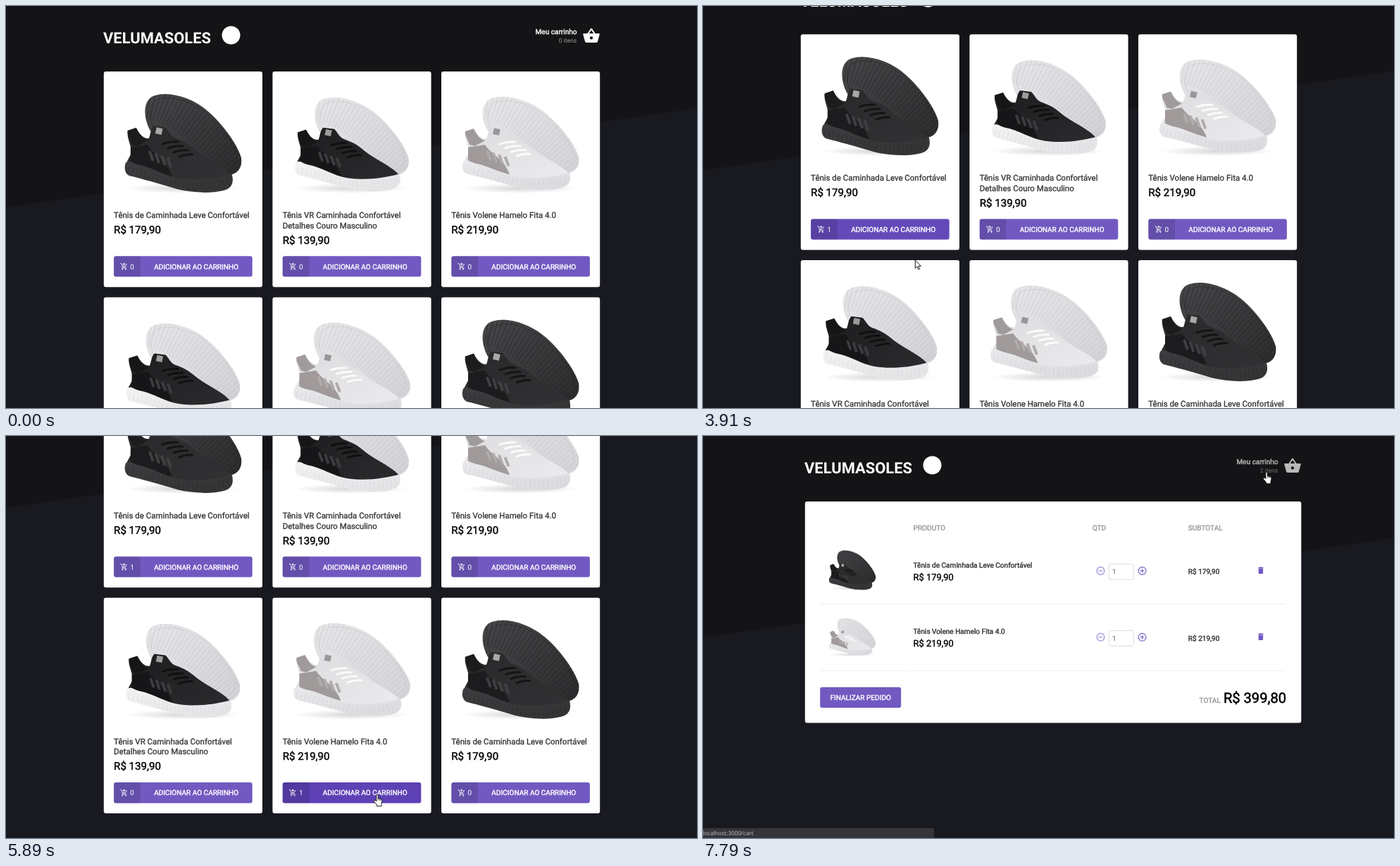
These frames come from a looping animation (981x571 px, 8 s). An HTML page:

```html
<!DOCTYPE html>
<html lang="pt-BR">
<head>
<meta charset="utf-8">
<title>Loja de tênis</title>
<style>
html, body { margin: 0; width: 100%; height: 100%; overflow: hidden; background: #191920; }
svg { display: block; }
text { font-family: Roboto, Arial, sans-serif; text-rendering: geometricPrecision; white-space: pre; }
</style>
</head>
<body>
<svg id="stage" width="981" height="571" viewBox="0 0 981 571"></svg>
<script>
const LOOP = 8000;
const PURPLE = [113, 89, 193], DEEP = [93, 65, 181];
const rgb = c => `rgb(${c.map(Math.round)})`;

// ---- drawing helpers ----
function text(x, y, s, size, o = {}) {
  const fill = o.fill || '#fff';
  const bold = o.bold ? ` stroke="${fill}" stroke-width="${(size * o.bold).toFixed(2)}"` : '';
  const id = o.id ? ` id="${o.id}"` : '';
  return `<text${id} x="${x}" y="${y}" font-size="${size}" fill="${fill}"${bold}` +
    ` text-anchor="${o.anchor || 'start'}" font-weight="${o.weight || 400}">${s}</text>`;
}
const rect = (x, y, w, h, fill, r = 0, more = '') =>
  `<rect x="${x}" y="${y}" width="${w}" height="${h}" rx="${r}" fill="${fill}" ${more}/>`;
const use = (id, x, y, k = 1) =>
  `<use href="#${id}" transform="translate(${x} ${y}) scale(${k})"/>`;

// ---- shoe pictures, in card coordinates ----
const BACK = 'M66 84C56 66 55 42 70 35C92 26 126 38 146 55C168 73 190 104 195 122C198 140 186 149 172 147C140 142 100 120 66 84Z';
const UPPER = 'M34 84L46 80C50 88 56 96 64 95C67 88 66 82 71 77L87 79C92 84 94 91 101 94C112 98 120 102 128 109C142 122 166 132 178 144C184 150 183 157 180 160C140 168 90 158 32 142C29 130 36 124 39 116C40 106 32 94 34 84Z';
const SOLE = 'M31 130C36 124 40 130 48 132C70 136 86 149 106 152C134 156 160 152 182 146C185 158 182 166 170 169C150 174 124 172 104 167C78 159 52 152 36 148C29 144 29 136 31 130Z';
const PANEL = 'M38 108L62 104C70 118 90 126 97 149C78 143 58 135 38 130Z';

const shoes = {
  dark: { back: ['#47474a', '#2c2c2e'], ridge: '#1d1d1f', upper: ['#29292b', '#323234'], sole: ['#3d3d40', '#333335'],
    line: '#232325', panel: '#1c1c1e', strap: '#3f3f42', lace: '#141416', tag: '#a8a8a8', move: '' },
  mixed: { back: ['#e6e6e9', '#d2d2d6'], ridge: '#bcbcc2', upper: ['#1d1d1f', '#2c2c2e'], sole: ['#f3f3f4', '#e2e2e5'],
    line: '#cfcfd3', panel: '#161618', strap: '#3c3c3f', lace: '#0f0f11', tag: '#9c9c9c',
    move: 'translate(2.7 6.5) scale(.976 .952)' },
  light: { back: ['#e6e6e8', '#d4d4d8'], ridge: '#bebec4', upper: ['#dcdcdf', '#ececef'], sole: ['#e9e9ec', '#dadade'],
    line: '#c6c6cb', panel: '#a09a9a', strap: '#b1abab', lace: '#fbfbfc', tag: '#98989a',
    move: 'translate(0 5.7) scale(1 .945)' }
};

function gradient(id, [a, b]) {
  return `<linearGradient id="${id}" x1="0" y1="0" x2="1" y2="1"><stop stop-color="${a}"/><stop offset="1" stop-color="${b}"/></linearGradient>`;
}

function shoe(name) {
  const s = shoes[name];
  let laces = '', straps = '';
  for (let i = 0; i < 4; i++) {
    laces += `M${83 + i * 8} ${103 + i * 6}q11 -4 ${22 - i} -3`;
    straps += `M${65 + i * 8.5} ${113 + i * 3}l5 14`;
  }
  return gradient(name + 'Back', s.back) + gradient(name + 'Upper', s.upper) + gradient(name + 'Sole', s.sole) +
    `<g id="${name}"><ellipse cx="112" cy="166" rx="82" ry="7" fill="url(#shade)"/><g transform="${s.move}">
    <path d="${BACK}" fill="url(#${name}Back)"/>
    <path d="M64 46C105 52 152 92 192 139" clip-path="url(#backClip)" fill="none" stroke="${s.ridge}" stroke-width="44" stroke-dasharray="1.2 4.6" opacity=".42"/>
    <path d="${BACK}" transform="translate(13 9) scale(.9)" fill="none" stroke="${s.ridge}" stroke-width="1" opacity=".5"/>
    <path d="${UPPER}" fill="url(#${name}Upper)"/>
    <path d="M34 84L46 80C50 88 54 96 62 98L48 106L40 104C39 97 33 92 34 84Z" fill="${s.panel}"/>
    <path d="${PANEL}" fill="${s.panel}"/>
    <path d="${straps}" stroke="${s.strap}" stroke-width="4"/>
    <path d="${laces}" fill="none" stroke="${s.lace}" stroke-width="3" stroke-linecap="round"/>
    <path d="${SOLE}" fill="url(#${name}Sole)"/>
    <path d="M34 140C70 148 92 160 118 162C146 164 166 161 181 155" fill="none" stroke="${s.line}" stroke-width="11" stroke-dasharray=".8 5.5" opacity=".55"/>
    <rect x="74" y="80" width="9" height="9" transform="rotate(12 78 84)" fill="${s.tag}"/></g></g>`;
}

const CART = `<g id="addCart" fill="none" stroke="#fff" stroke-width="2">
  <path d="M1 3H3.6L8 12H15.6L20 4.4M8 12L6.2 15.5Q6 16 7 16H19M12 1V9M8 5H16"/></g>
  <g id="wheels" fill="#fff"><circle cx="7" cy="20" r="2"/><circle cx="17" cy="20" r="2"/></g>`;

const BASKET = `<path id="basket" fill="#fff" fill-rule="evenodd" d="M17.2 9L12.8 2.4Q12 1.6 11.2 2.4L6.8 9H2Q1 9 1 10L3.6 19.5Q4 21 5.5 21H18.5Q20 21 20.4 19.5L23 10Q23 9 22 9ZM9 9L12 4.6L15 9ZM12 17A2 2 0 0 1 12 13A2 2 0 0 1 12 17Z"/>`;

const defs = `<defs>
  <radialGradient id="shade"><stop stop-color="#000" stop-opacity=".16"/><stop offset="1" stop-color="#000" stop-opacity="0"/></radialGradient>
  <clipPath id="backClip"><path d="${BACK}"/></clipPath>
  ${Object.keys(shoes).map(shoe).join('')}${CART}${BASKET}
  <path id="trash" fill="#7159c1" d="M6 19Q6 21 8 21H16Q18 21 18 19V7H6ZM19 4H15.5L14.5 3H9.5L8.5 4H5V6H19Z"/>
  </defs>`;

// ---- products ----
const items = {
  dark: { title: ['Tênis de Caminhada Leve Confortável'], price: 'R$ 179,90' },
  mixed: { title: ['Tênis VR Caminhada Confortável', 'Detalhes Couro Masculino'], price: 'R$ 139,90' },
  light: { title: ['Tênis Volene Hamelo Fita 4.0'], price: 'R$ 219,90' }
};
const grid = ['dark', 'mixed', 'light', 'mixed', 'light', 'dark'];

function card(name, i) {
  const x = 138.8 + (i % 3) * 239.6, y = 93 + Math.floor(i / 3) * 320.8;
  const p = items[name], last = p.title.length - 1;
  return `<g transform="translate(${x} ${y})">` + rect(0, 0, 225.2, 306.2, '#fff', 3) + use(name, 0, 0) +
    p.title.map((s, n) => text(14.3, 208.2 + n * 14.4, s, 11.48, { fill: '#333', bold: .026 })).join('') +
    text(14.3, 230.2 + last * 14.4, p.price, 15.08, { fill: '#000', bold: .028 }) +
    rect(14.3, 262.3, 196.6, 29.3, rgb(PURPLE), 3, `id="btn${i}"`) +
    `<path d="M17.3 262.3H52V291.6H17.3a3 3 0 0 1 -3 -3V265.3a3 3 0 0 1 3 -3Z" fill="#000" opacity=".12"/>` +
    use('addCart', 23.1, 271.2, .48) + use('wheels', 23.1, 271.2, .48) +
    text(37.5, 280.6, '0', 10.05, { id: 'n' + i }) +
    text(131.3, 280.6, 'ADICIONAR AO CARRINHO', 10.05, { bold: .042, anchor: 'middle' }) + '</g>';
}

function header(id) {
  return text(138, 53.4, 'VELUMASOLES', 21.9, { weight: 700 }) +
    '<circle cx="319.5" cy="41.5" r="13" fill="#fff"/>' +
    `<g id="${id}">` +
    text(810.5, 39.8, 'Meu carrinho', 10.05, { bold: .042, anchor: 'end' }) +
    text(810.3, 51.6, '2 itens', 8.6, { fill: '#999', anchor: 'end', id: id + 'Qty' }) +
    use('basket', 818.1, 29.3, 1.075) + '</g>';
}

// ---- cart page ----
const ring = (cx, plus, opacity) =>
  `<g fill="none" stroke="#7159c1" stroke-width="1.1" opacity="${opacity}"><circle cx="${cx}" cy="191.5" r="5.4"/>` +
  `<path d="M${cx - 3} 191.5h6${plus ? `M${cx} 188.5v6` : ''}"/></g>`;

function cartRow(name, n) {
  const p = items[name], dark = { fill: '#333', bold: .04 };
  return `<g transform="translate(0 ${n * 94.3})">` + use(name, 167, 149.8, .4) +
    text(298.6, 186.7, p.title[0], 10.05, dark) +
    text(298.6, 205.2, p.price, 12.92, { fill: '#000', bold: .03 }) +
    ring(564.5, false, .75) + rect(576.2, 182, 35.4, 22, '#fff', 3, 'stroke="#ddd"') +
    text(581, 196.4, '1', 10.05, { fill: '#666' }) + ring(623.6, true, 1) +
    text(688.8, 196.3, p.price, 10.05, dark) + use('trash', 785.4, 184.4, .54) +
    '<path d="M167 239H288M290 239H827" stroke="#eee"/></g>';
}

function cartPage() {
  const head = (x, s) => text(x, 133.8, s, 10.05, { fill: '#999', bold: .04 });
  return '<g transform="translate(6 0)">' + header('bag2') + '</g>' +
    rect(144.8, 93, 704.5, 314.5, '#fff', 3) +
    head(298.6, 'PRODUTO') + head(552.8, 'QTD') + head(688.8, 'SUBTOTAL') +
    cartRow('dark', 0) + cartRow('light', 1) +
    rect(166.2, 356.8, 115, 29.3, '#7159c1', 3) +
    text(223.7, 375, 'FINALIZAR PEDIDO', 10.05, { bold: .042, anchor: 'middle' }) +
    text(704.6, 379.2, 'TOTAL', 10.05, { fill: '#999', bold: .04 }) +
    text(828, 379.2, 'R$ 399,80', 20.1, { fill: '#000', bold: .028, anchor: 'end' });
}

const stage = document.getElementById('stage');
stage.innerHTML = defs +
  rect(0, 0, 981, 571, '#191920') +
  `<g id="page"><path d="M0 -10H981V145L0 286Z" fill="#141417"/>
   <g id="shop">${header('bag')}${grid.map(card).join('')}</g>
   <g id="cart">${cartPage()}</g></g>
   <g id="status">${rect(-4, 557, 332, 18, '#35353a', 2)}
   <text x="-.5" y="567.3" font-size="8.1" fill="#c4c4c8" style="font-family:'Open Sans',sans-serif">localhost:3000/cart</text></g>
   <g id="mouse" stroke="#000" stroke-width=".9" fill="#fff" stroke-linejoin="round">
   <path id="arrow" d="M0 0V11.6L2.7 9.1L4.5 13.2L6.3 12.4L4.5 8.4H8.2Z"/>
   <g id="hand"><path d="M-1.2 1.4C-1.2 -.2 1.2 -.2 1.2 1.4V5.6L5.4 6.6Q7.3 7.1 7.1 9.4L6 13.6V16.8H-.4V15L-4.2 10.6C-5.2 9 -3.6 7.6 -2.3 8.8L-1.2 9.8Z"/>
   <path d="M1.2 5.6V8.6M3.3 6.3V8.8M5.3 6.8V9" stroke-width=".7"/></g></g>`;
const $ = id => document.getElementById(id);

// ---- motion: [ms, values...] ----
const scroll = [[3600, 0], [3720, 8], [3910, 52.5], [4140, 118], [4370, 164], [4580, 182], [4690, 184],
  [6160, 184], [6280, 160], [6460, 88], [6650, 25.2], [6790, 6], [6920, 0]];
const mouse = [[530, 938, 568], [660, 800, 505], [900, 483, 404], [1100, 345, 378], [1290, 293, 369],
  [1370, 293, 369], [1490, 283, 360], [1820, 283, 360], [1890, 279, 361], [2610, 279, 361],
  [2680, 283, 369], [2950, 287, 369], [3370, 287, 369], [3420, 286, 370], [3640, 286, 370], [3910, 301, 361],
  [4100, 340, 357], [4400, 650, 344], [4580, 748, 340], [4700, 746, 345], [5200, 546, 477], [5270, 535, 490],
  [5480, 527, 509], [6160, 527, 509], [6460, 590, 395], [6650, 635, 338], [6950, 640, 334],
  [7250, 722, 190], [7520, 790, 66], [7720, 800, 51]];
const hands = [[1130, 3650], [5250, 6220], [7480, LOOP]];

function at(keys, t) {
  if (t <= keys[0][0]) return keys[0].slice(1);
  for (let i = 1; i < keys.length; i++) {
    const a = keys[i - 1], b = keys[i];
    if (t < b[0]) return a.slice(1).map((v, n) => v + (b[n + 1] - v) * (t - a[0]) / (b[0] - a[0]));
  }
  return keys[keys.length - 1].slice(1);
}
const show = (id, on) => $(id).setAttribute('display', on ? 'inline' : 'none');
const label = (id, s) => { if ($(id).textContent !== s) $(id).textContent = s; };
const fade = (t, on, off) => at([[on, 0], [on + 200, 1], [off, 1], [off + 200, 0]], t)[0];
const tint = (id, k) => $(id).setAttribute('fill', rgb(PURPLE.map((v, i) => v + (DEEP[i] - v) * k)));

function draw(t) {
  const inCart = t >= 7790, [x, y] = at(mouse, t);
  const hand = hands.some(([a, b]) => t >= a && t < b);
  $('page').setAttribute('transform', `translate(0 ${-at(scroll, t)[0]})`);
  show('shop', !inCart);
  show('cart', inCart);
  show('status', t >= 7560);
  show('mouse', t >= 530);
  show('hand', hand);
  show('arrow', !hand);
  $('mouse').setAttribute('transform', `translate(${x} ${y})`);
  tint('btn0', fade(t, 1130, 3840));
  tint('btn4', fade(t, 5250, 6220));
  const dim = 1 - .3 * fade(t, 7480, LOOP);
  $('bag').setAttribute('opacity', dim);
  $('bag2').setAttribute('opacity', dim);
  label('n0', t >= 2280 ? '1' : '0');
  label('n4', t >= 5680 ? '1' : '0');
  label('bagQty', t >= 5680 ? '2 itens' : t >= 2280 ? '1 item' : '0 itens');
}

const start = performance.now();
function tick() {
  draw((performance.now() - start) % LOOP);
  requestAnimationFrame(tick);
}
draw(0);
tick();
</script>
</body>
</html>
```
